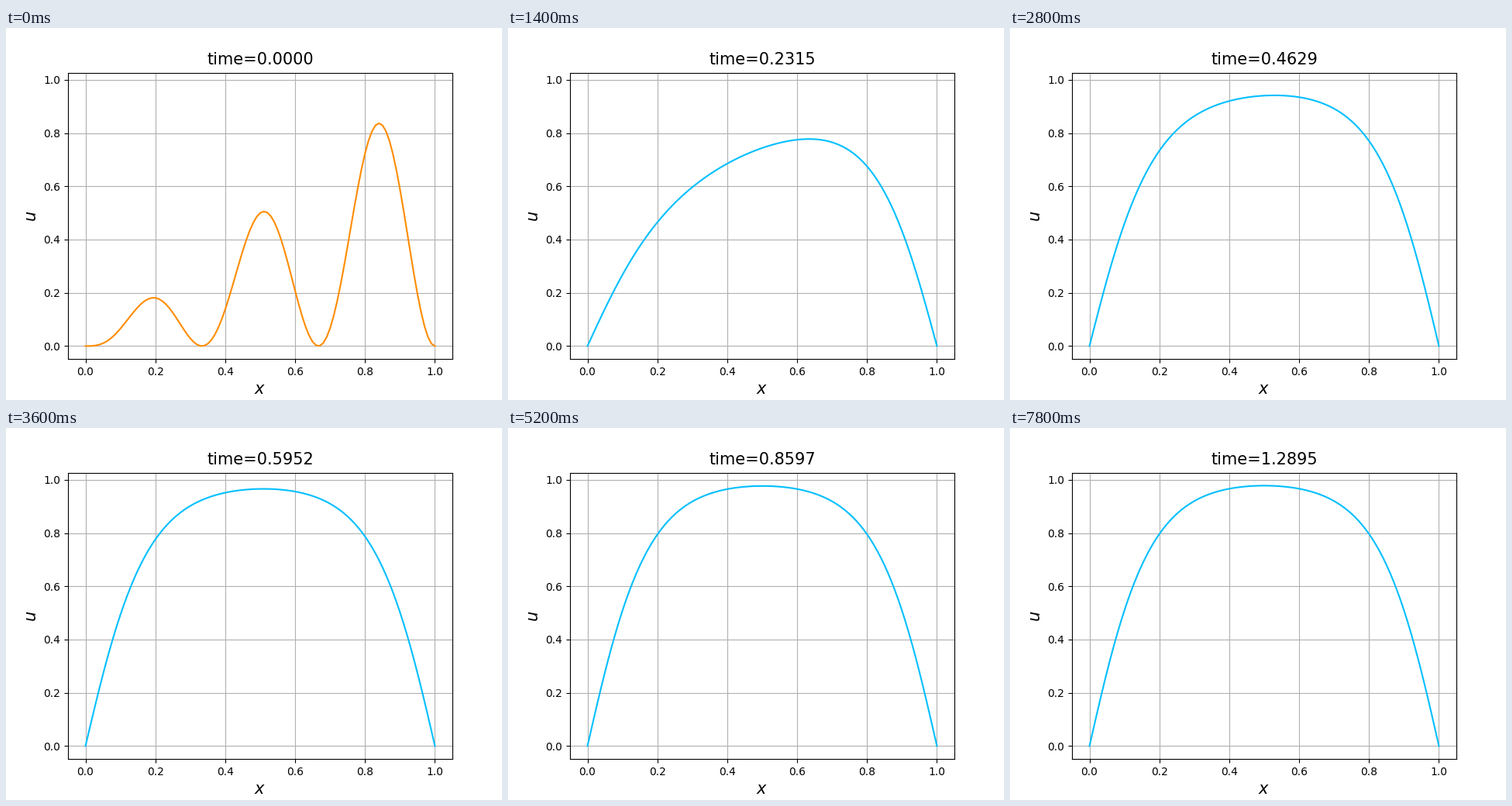
These frames come from a looping animation (640 px wide and 480 px high, 8000 ms). A matplotlib script:

```python
import numpy as np
import matplotlib.pyplot as plt
from matplotlib.animation import FuncAnimation

# Fisher equation: u_t = D u_xx + R u (1 - u), with u = 0 at both ends
D, R = 0.1, 10.0
FRAMES, INTERVAL = 40, 200
FRAME_TIME = 0.0330645
SUBSTEPS = 70

x = np.linspace(0, 1, 101)
dx = x[1] - x[0]
dt = FRAME_TIME / SUBSTEPS


def step(u):
    new = u.copy()
    mid = u[1:-1]
    lap = (u[2:] - 2 * mid + u[:-2]) / dx**2
    new[1:-1] += dt * (D * lap + R * mid * (1 - mid))
    return new


def solve():
    u = x * np.sin(3 * np.pi * x) ** 2
    states = [u]
    for _ in range(FRAMES - 1):
        for _ in range(SUBSTEPS):
            u = step(u)
        states.append(u)
    return states


states = solve()
peak = max(u.max() for u in states)

fig, ax = plt.subplots(figsize=(6.4, 4.8), dpi=100)
ax.set_xlim(-0.05, 1.05)
ax.set_ylim(-0.05 * peak, 1.05 * peak)
ax.set_xlabel("$x$", fontsize=15)
ax.set_ylabel("$u$", fontsize=15)
ax.grid()
curve, = ax.plot(x, states[0], color="darkorange")
label = ax.text(0.5, 1.03, "", transform=ax.transAxes, ha="center", fontsize=15)


def draw(i):
    curve.set_ydata(states[i])
    curve.set_color("deepskyblue" if i else "darkorange")
    label.set_text(f"time={i * FRAME_TIME:.4f}")
    return curve, label


anim = FuncAnimation(fig, draw, frames=FRAMES, interval=INTERVAL,
                     init_func=lambda: draw(0), repeat=True, repeat_delay=0)
plt.show()
```
